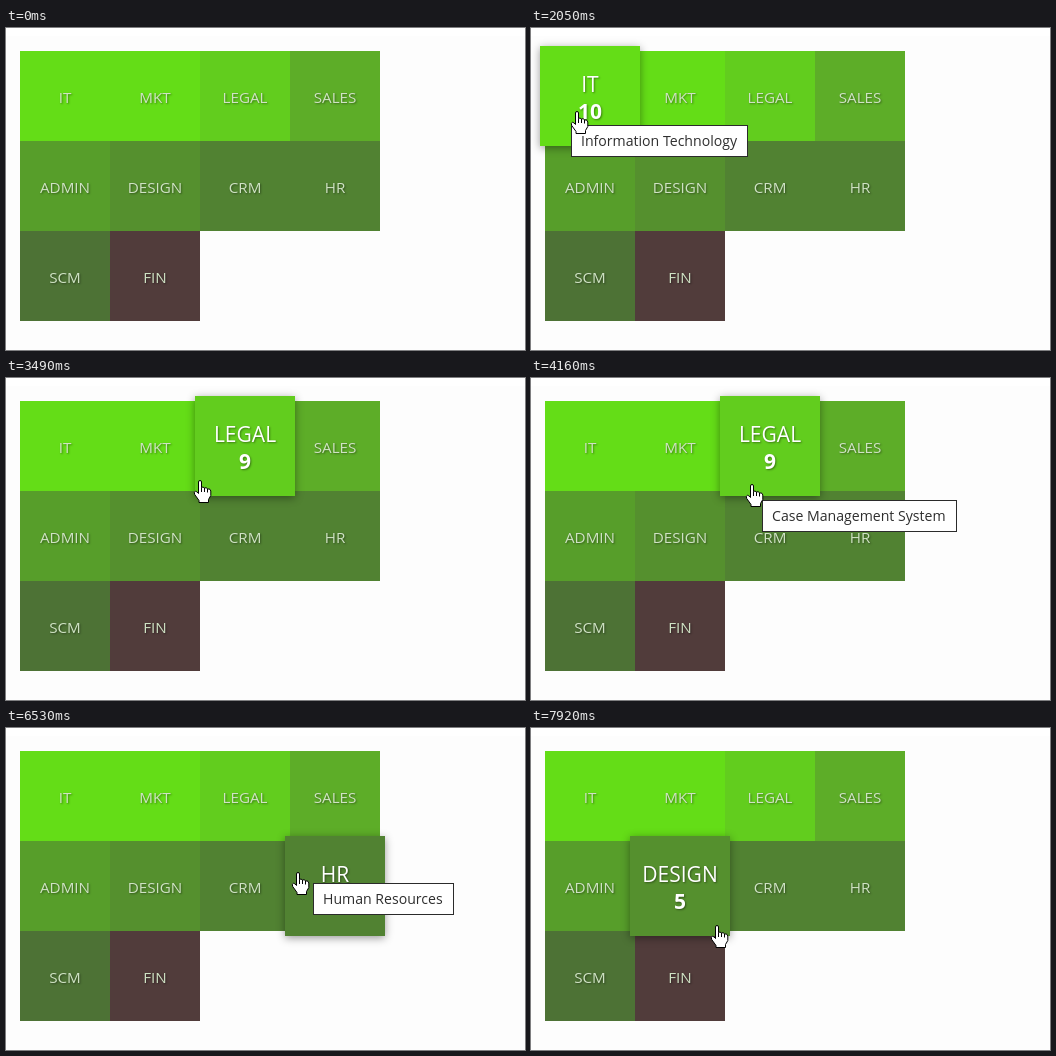
An HTML page that plays this animation: 519 by 322 pixels, repeating every 8 s.

```html
<!DOCTYPE html>
<html lang="en">
<head>
<meta charset="utf-8">
<title>Department tiles</title>
<style>
  html, body { margin: 0; width: 100%; height: 100%; overflow: hidden; background: #fdfdfd; }
  svg { display: block; width: 519px; height: 322px; font-family: "Open Sans", "Noto Sans", sans-serif; cursor: inherit; }
  .tile text { text-anchor: middle; text-shadow: 1px 1px 2px rgba(0, 0, 0, .4); }
  .count { font-weight: 700; font-size: 21px; fill: #fff; }
  #tip text { font-size: 14.1px; fill: #2e2e2e; }
</style>
</head>
<body>
<svg viewBox="0 0 519 322">
  <rect width="519" height="322" fill="#fdfdfd"/>
  <rect width="519" height="8" fill="#fff"/>
  <g id="tiles"></g>
  <g id="tip">
    <rect x=".5" y=".5" height="31" fill="#fff" stroke="#2b2b2b"/>
    <text x="10" y="21"></text>
  </g>
  <path id="hand" fill="#fff" stroke="#000" stroke-linejoin="round"
    d="M-1.5 13.5V2Q-1.5 .5 0 .5T1.5 2V7.5Q3 6.3 4.5 8Q6.2 7 7.5 8.8Q10.8 8.6 10.8 11V15.5L8.5 19.5V22.5H-1V20.5L-5.3 14.5Q-6.5 11.8 -4.5 11.3Q-3.2 11.3 -1.5 13.5ZM1.5 7.5V12M4.5 8V12M7.5 8.8V12.5"/>
</svg>
<script>
const LOOP = 8000, SIZE = 90, LEFT = 14, TOP = 23;
const DEPTS = [
  ['IT', 10, '#64dd17'], ['MKT', 10, '#64dd17'], ['LEGAL', 9, '#62cd1e'], ['SALES', 7, '#5dad28'],
  ['ADMIN', 6, '#579e2a'], ['DESIGN', 5, '#55902e'], ['CRM', 4, '#518232'], ['HR', 4, '#518232'],
  ['SCM', 3, '#4d7235'], ['FIN', 0, '#513c3b'],
];

// Pointer moves: start, end, steps, target x, target y, easing power
const MOVES = [
  [390, 460, 2, 30, 81, 1], [2050, 2330, 5, 111, 91, 1], [3080, 3630, 8, 221, 106, 1],
  [4230, 4640, 7, 301, 110, 1], [5520, 5860, 5, 296, 139, 1], [6130, 6130, 1, 297, 138, 1],
  [6390, 6950, 9, 255, 194, 2], [7150, 7150, 1, 255, 197, 1], [7350, 7350, 1, 254, 198, 1],
  [7500, 7920, 7, 186, 197, 1],
];

// Hovers: start, tile, tooltip time, tooltip x, tooltip y, tooltip text
const HOVERS = [
  [390, 0, 990, 40, 97, 'Information Technology'],
  [2260, 1, 2810, 121, 107, 'Marketing'],
  [3394, 2, 4160, 231, 122, 'Case Management System'],
  [4503, 3, 5120, 311, 126, 'Sales and Booking'],
  [5605, 7, 6130, 307, 155, 'Human Resources'],
  [6740, 6, 7350, 264, 214, 'Customer Relationship Management'],
  [7850, 5, LOOP, 0, 0, ''],
];

const $ = q => document.querySelector(q);
const lerp = (a, b, p) => a + (b - a) * p;
const clamp = v => Math.max(0, Math.min(1, v));

function add(parent, name, attrs, text) {
  const el = document.createElementNS('http://www.w3.org/2000/svg', name);
  set(el, attrs);
  if (text !== undefined) el.textContent = text;
  return parent.appendChild(el);
}
function set(el, attrs) {
  for (const k in attrs) el.setAttribute(k, attrs[k]);
}

const layer = $('#tiles'), tip = $('#tip'), hand = $('#hand');
const tipBox = $('#tip rect'), tipText = $('#tip text');

const tiles = DEPTS.map(([name, count, color], i) => {
  const x = LEFT + SIZE * (i % 4 + .5), y = TOP + SIZE * (Math.floor(i / 4) + .5);
  const g = add(layer, 'g', { class: 'tile', transform: `translate(${x} ${y})` });
  return {
    g,
    box: add(g, 'rect', { fill: color }),
    label: add(g, 'text', {}, name),
    count: add(g, 'text', { class: 'count', y: 23 }, count),
  };
});

function drawTile({ g, box, label, count }, p) {
  const r = lerp(45, 50, p);
  set(box, { x: -r, y: -r, width: 2 * r, height: 2 * r });
  box.style.filter = p ? `drop-shadow(0 2px 4px rgba(0,0,0,${.4 * p}))` : 'none';
  label.style.fontSize = lerp(15.2, 21, p) + 'px';
  set(label, { y: lerp(6.5, -4, p), fill: `rgb(${lerp(207, 255, p)},${lerp(226, 255, p)},${lerp(196, 255, p)})` });
  count.style.opacity = p;
  if (p && g !== layer.lastChild) layer.appendChild(g);
}

function pointer(t) {
  let x = 30, y = 90;
  for (const [start, end, steps, tx, ty, power] of MOVES) {
    if (t < start) break;
    const gap = (end - start) / (steps - 1 || 1);
    const k = t >= end ? steps : Math.floor((t - start) / gap + 1e-6) + 1;
    const p = (k / steps) ** power;
    x = lerp(x, tx, p);
    y = lerp(y, ty, p);
  }
  return [x, y];
}

// Each hover grows in two held steps
const grow = (t, start) => t < start ? 0 : clamp((Math.floor((t - start) / 68) + 1) / 2);

function draw(t) {
  const now = HOVERS.filter(h => h[0] <= t).length - 1;
  const size = tiles.map(() => 0);
  if (now > 0) size[HOVERS[now - 1][1]] = 1 - grow(t, HOVERS[now][0]);
  if (now >= 0) size[HOVERS[now][1]] = grow(t, HOVERS[now][0]);
  tiles.forEach((tile, i) => { if (!size[i]) drawTile(tile, 0); });
  [now - 1, now].forEach(n => {
    if (n >= 0) drawTile(tiles[HOVERS[n][1]], size[HOVERS[n][1]]);
  });

  const [, , at, x, y, text] = HOVERS[now] || [0, 0, LOOP];
  const shown = t >= at;
  tip.style.display = shown ? '' : 'none';
  if (shown) {
    tipText.textContent = text;
    set(tip, { transform: `translate(${x} ${y})` });
    set(tipBox, { width: Math.round(tipText.getComputedTextLength()) + 20 });
  }

  hand.style.display = t < 390 ? 'none' : '';
  set(hand, { transform: `translate(${pointer(t).map(Math.round).join(' ')})` });
}

function tick() {
  draw(performance.now() % LOOP);
  requestAnimationFrame(tick);
}
tick();
</script>
</body>
</html>
```
